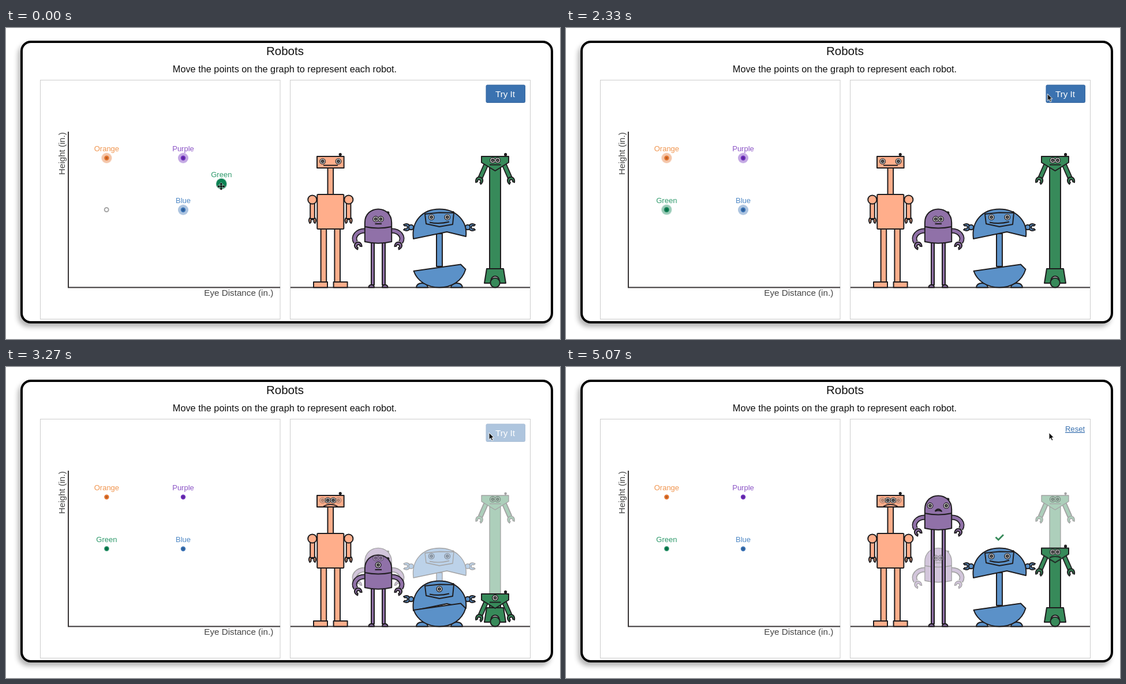
An HTML page for the animation above (5470 ms loop, 960x540 px).

```html
<!DOCTYPE html>
<html lang="en">
<head>
<meta charset="utf-8">
<title>Robots</title>
<style>
html, body { margin: 0; width: 100%; height: 100%; overflow: hidden; background: #fff; }
.card {
  position: absolute; left: 25px; top: 22px; width: 923px; height: 491px;
  box-sizing: border-box; border: 4px solid #000; border-radius: 18px;
  background: #fff; box-shadow: -4px 6px 9px rgba(0, 0, 0, .3);
}
svg { position: absolute; left: 0; top: 0; }
text { font-family: "Liberation Sans", Arial, sans-serif; text-anchor: middle; }
.panel { fill: none; stroke: #ccc; }
.axis { fill: none; stroke: #393536; stroke-width: 2; }
.name { font-size: 13px; }
.line { fill: none; }
.robot { stroke: #1f1d1f; stroke-width: 2; stroke-linejoin: round; }

/* hard changes on the shared clock */
.show, .gone, .ghost, .halo, .drag, .drop, .snap, .grip, .arrow, .button, .reset {
  animation: 5.47s step-end infinite both;
}
.show { animation-name: show; }
.gone, .halo { animation-name: gone; }
.ghost { animation-name: ghost; }
.drag, .grip { animation-name: letgo; }
.drop, .arrow { animation-name: freed; }
.snap { animation-name: snap; }
.button { animation-name: button; }
.reset { animation-name: reset; }
.cursor { animation: cursor 5.47s linear infinite both; }

/* each robot plays the same part, 600 ms after its neighbour */
.live :is(.up, .rod, .eye, .flat, .late) {
  animation: 5.47s infinite both;
  animation-delay: calc(var(--i) * .6s);
}
.live .up { animation-name: lift; }
.live .rod { animation-name: rod; }
.live .eye { animation-name: spread; }
.live .flat { animation-name: before; animation-timing-function: step-end; }
.live .late { animation-name: after; animation-timing-function: step-end; }

@keyframes show { 0% { opacity: 0 } 44.8%, 100% { opacity: 1 } }
@keyframes gone { 0% { opacity: 1 } 44.8%, 100% { opacity: 0 } }
@keyframes ghost { 0% { opacity: 1; stroke-width: 2px } 44.8%, 100% { opacity: .41; stroke-width: 1.3px } }
@keyframes letgo { 0% { opacity: 1 } 32.7%, 100% { opacity: 0 } }
@keyframes freed { 0% { opacity: 0 } 32.7%, 100% { opacity: 1 } }
@keyframes button { 0% { opacity: 1 } 44.8% { opacity: .41 } 92.4%, 100% { opacity: 0 } }
@keyframes reset { 0% { opacity: 0 } 92.4%, 100% { opacity: 1 } }
@keyframes before { 0% { opacity: 1 } 58%, 100% { opacity: 0 } }
@keyframes after { 0% { opacity: 0 } 58%, 100% { opacity: 1 } }
@keyframes snap {
  0% { transform: translate(373.3px, 270.5px) }
  1.5% { transform: translate(340.2px, 270.5px) }
  4.6% { transform: translate(307px, 270.5px) }
  7.6% { transform: translate(273.8px, 270.5px) }
  11.4% { transform: translate(240.7px, 315.5px) }
  13% { transform: translate(207.5px, 315.5px) }
  17.4%, 100% { transform: translate(174.4px, 315.5px) }
}
@keyframes cursor {
  0% { transform: translate(373px, 275px) }
  10.97% { transform: translate(250px, 301px) }
  14.63% { transform: translate(199px, 322px) }
  20.66% { transform: translate(177px, 323px) }
  23.2% { transform: translate(178px, 323px) }
  31.6% { transform: translate(182px, 323px); animation-timing-function: ease-in-out }
  41.5% { transform: translate(818px, 116px) }
  42.8%, 100% { transform: translate(837px, 114px) }
}
@keyframes lift {
  0%, 48.12% { transform: translateY(var(--a)); animation-timing-function: cubic-bezier(.215, .61, .355, 1) }
  53.24%, 100% { transform: translateY(var(--b)) }
}
@keyframes rod {
  0%, 48.12% { y: var(--y0); height: var(--h0); animation-timing-function: cubic-bezier(.215, .61, .355, 1) }
  53.24%, 100% { y: var(--y1); height: var(--h1) }
}
@keyframes spread {
  0%, 53.24% { transform: translateX(0); animation-timing-function: cubic-bezier(.215, .61, .355, 1) }
  58%, 100% { transform: translateX(var(--e)) }
}
</style>
</head>
<body>
<div class="card"></div>
<svg width="960" height="540" viewBox="0 0 960 540">
  <text x="483.5" y="47" font-size="20.5" fill="#111">Robots</text>
  <text x="483" y="77" font-size="16.3" fill="#111">Move the points on the graph to represent each robot.</text>
  <rect class="panel" x="59.5" y="90.5" width="415.5" height="415"/>
  <rect class="panel" x="492.5" y="90.5" width="416" height="415"/>
  <path class="axis" d="M108 180V450.5H475M493 450.5H908"/>
  <text transform="translate(102 218) rotate(-90)" font-size="15.1" fill="#444">Height (in.)</text>
  <text x="403.3" y="465" font-size="15.2" fill="#444">Eye Distance (in.)</text>
  <circle class="gone" cx="174.2" cy="315.5" r="3.5" fill="#fff" stroke="#a5a5a5" stroke-width="2"/>
  <g id="points"></g>
  <g id="robots"></g>
  <g class="button">
    <rect x="832" y="99" width="67.5" height="30.5" rx="2" fill="#3b72b0" stroke="#34659d"/>
    <text x="865" y="119.7" font-size="15.2" fill="#fff">Try It</text>
  </g>
  <text class="reset" x="882" y="112" font-size="13.1" fill="#3b72b0" text-decoration="underline">Reset</text>
  <g class="cursor">
    <path class="grip" id="grip" fill="#000" stroke="#fff" stroke-width="1" paint-order="stroke"/>
    <path class="arrow" d="M0 0V12.2L2.8 9.6L4.8 14L7 13L5 8.8H8.6Z" fill="#111" stroke="#fff" stroke-width="1"/>
  </g>
</svg>
<script>
const byId = id => document.getElementById(id);
const path = (d, more = '') => `<path d="${d}" ${more}/>`;
const line = (d, cls = '') => path(d, `class="line ${cls}"`);
const circle = (x, y, r, more = '') => `<circle cx="${x}" cy="${y}" r="${r}" ${more}/>`;
const box = (x, y, w, h, more = '') => `<rect x="${x}" y="${y}" width="${w}" height="${h}" ${more}/>`;
const mirror = (cx, s) => `${s}<g transform="translate(${2 * cx} 0) scale(-1 1)">${s}</g>`;
const up = (a, b, s) => `<g class="up" style="--a:${a}px;--b:${b}px">${s}</g>`;
const antenna = (x0, y0, x, y) => line(`M${x0} ${y0}L${x} ${y}`) + circle(x, y, 1.6, 'fill="#1f1d1f"');

// A bar with a fixed foot whose top travels from a to b.
function rod(x, y, w, foot, a, b) {
  const h = d => Math.max(0, foot - y - d);
  return box(x, y, w, foot - y,
    `class="rod" style="--y0:${y + a}px;--h0:${h(a)}px;--y1:${y + b}px;--h1:${h(b)}px"`);
}
const limb = (d, fill) => path(d, 'fill="none" stroke-width="9"') +
  path(d, `fill="none" stroke="${fill}" stroke-width="5.5"`);
const claw = (x, y, turn) => path(
  'M-4.5 6C-8 0 -5 -5 0 -5C5 -5 8 0 4.5 6L2.2 3.6C4 1 2 -.5 0 -.5C-2 -.5 -4 1 -2.2 3.6Z',
  `transform="translate(${x} ${y}) rotate(${turn})"`);

const eye = (x, y) => circle(x, y, 4.7, 'fill="#fff" stroke-width="1.3"') +
  circle(x, y, 2.4, 'fill="#555" stroke-width="1.2"');
const eyes = (r, half) => eye(r.cx - half, r.eyeY) + eye(r.cx + half, r.eyeY);
const liveEyes = r => [-1, 1].map(k =>
  `<g class="eye" style="--e:${k * r.aim}px">${eye(r.cx, r.eyeY)}</g>`).join('');

const robots = [
  {
    fill: '#ffae8b', cx: 562.3, eyeY: 231.5, half: 13.7, aim: 4.7, a: 121, b: 0,
    flat: 'M550 238.5H575', sad: 'M550 242Q562.3 235 574.5 242', glum: true,
    draw(face) {
      return mirror(this.cx, rod(545.6, 349, 9.6, 441, 81, 0) + box(533, 441, 24, 9.5)) +
        up(121, 0, box(557.5, 243, 9.6, 48) + antenna(579, 223, 579.2, 219.5) +
          box(539, 223, 46.6, 20) + face) +
        up(81, 0, mirror(this.cx, claw(531, 333, 0) + box(527.2, 302, 7.6, 29) + circle(530.8, 298, 7.6)) +
          box(539.3, 289, 46, 60, 'rx="1.5"'));
    }
  },
  {
    fill: '#9071a8', cx: 645, eyeY: 331.7, half: 4.4, aim: 14, a: 73, b: -91,
    flat: 'M639.5 340H651', sad: 'M639.5 341.5Q645 334 651 341.5Q645 339 639.5 341.5',
    draw(face) {
      return mirror(this.cx, rod(633, 373, 5, 446, 73, -91) +
          path('M628.5 450.5Q628.5 446 633.5 446Q638 446 638 450.5Z')) +
        up(73, -91, mirror(this.cx, limb('M622 352C608 352 600 363 606 372', this.fill) +
            claw(609.5, 377, -35)) + antenna(658, 325, 661.8, 320.8) +
          path('M621.8 371V338C622 306.500 668 306.500 668.200 338V371Q645 376.500 621.800 371Z') +
          line('M621.8 345Q645 350 668.2 345') + face);
    }
  },
  {
    fill: '#5b91c8', cx: 751, eyeY: 328.5, half: 13.8, aim: 13.8, a: 57, b: 0,
    flat: 'M734 337.500Q751 341 768 336.500', sad: 'M734 336.500Q751 342 768 335.500',
    extra: path('M744.5 295.5L749.3 300L758 291.3',
      'class="late" fill="none" stroke="#378a5a" stroke-width="2.8" stroke-linejoin="miter"'),
    draw(face) {
      return rod(746, 357, 10, 414, 57, 0) +
        mirror(this.cx, path('M711 450.500Q712 443 721 443Q730 443 731 450.500Z')) +
        up(57, 0, mirror(this.cx, claw(695, 346, 90) + circle(702, 346, 4.2)) +
          antenna(770, 324, 774.5, 320.5) +
          path('M706 366C702 335 722 314.500 751 314.500C780 314.500 800 335 797 362L764 354Z') +
          path('M726 323L751 320.500L776 321L774 341L751 345L728 340Z') + face) +
        path('M706.500 422L788 410.500L796.500 419C790 440 772 450.500 751 450.500C730 450.500 713 440 706.500 422Z');
    }
  },
  {
    fill: '#378a5a', cx: 847.6, eyeY: 229.7, half: 4.3, aim: 4.3, a: 171, b: 91.5,
    flat: 'M838 237.5H857.5', sad: 'M838 239.500Q847.600 235 857.500 239.500',
    draw(face) {
      return rod(838, 243, 19, 418, 171, 91.5) +
        path('M833 418H862L866 443H829Z') +
        circle(847.6, 438, 7, 'fill="#fff"') + circle(847.6, 442.3, 8.2) +
        up(171, 91.5, mirror(this.cx, limb('M832 237L822 260', this.fill) + claw(820.5, 264, 20)) +
          antenna(865.3, 223, 865.6, 219.7) +
          path('M824 223H871V233.500L847.600 248L824 233.500Z') + face);
    }
  }
];

const ghostMouth = r => r.glum ? line(r.flat, 'gone') + line(r.sad, 'show') : line(r.flat);
const layer = (cls, make) => `<g class="${cls}">` + robots.map((r, i) =>
  `<g class="robot" fill="${r.fill}" style="--i:${i};${cls === 'ghost' ? 'stroke-width:inherit' : ''}">${make(r)}</g>`).join('') + '</g>';

byId('robots').innerHTML =
  layer('ghost', r => r.draw(ghostMouth(r))) +
  layer('live show', r => r.draw(line(r.flat, 'flat') + line(r.sad, 'late') + liveEyes(r)) + (r.extra || '')) +
  layer('ghost', r => eyes(r, r.half));

const dot = color => circle(0, 0, 9, `class="halo" fill="${color}" fill-opacity=".42"`) +
  circle(0, 0, 4.2, `fill="${color}"`) + circle(0, 0, 2, 'fill="#000" fill-opacity=".2"');
const label = (name, color) => `<text class="name" y="-11.5" fill="${color}">${name}</text>`;
const point = (x, y, name, ink, color) =>
  `<g transform="translate(${x} ${y})">${dot(color)}${label(name, ink)}</g>`;

byId('points').innerHTML =
  point(174.4, 225.7, 'Orange', '#f0954f', '#e5752f') +
  point(307, 225.7, 'Purple', '#8c55c6', '#6f30bd') +
  point(307, 315.7, 'Blue', '#5089c6', '#3a72b5') +
  `<g class="snap"><g class="drop">${dot('#0c8253')}</g>` +
  circle(0, 0, 9.2, 'class="drag" fill="#0c8253"') + label('Green', '#2f9a6c') + '</g>';

// Four-way cursor: one arm repeated at right angles.
const arm = [[.8, -.8], [.8, -3.6], [2.7, -3.6], [0, -6.6], [-2.7, -3.6], [-.8, -3.6]];
const turn = ([x, y], n) => n ? turn([y, -x], n - 1) : [x, y];
byId('grip').setAttribute('d', 'M' + [0, 1, 2, 3].flatMap(n => arm.map(p => turn(p, n))).join('L') + 'Z');
</script>
</body>
</html>
```
